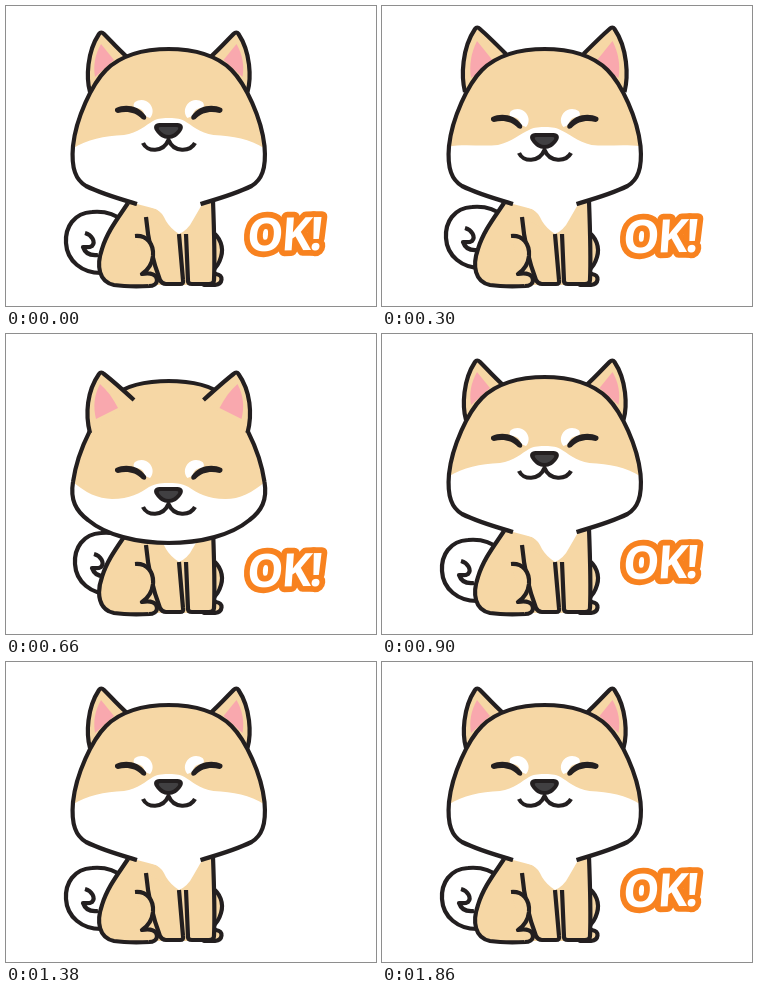
These frames come from a looping animation (370x300 px, 1.92 s). An HTML page:

```html
<!DOCTYPE html>
<html lang="en">
<head>
<meta charset="utf-8">
<title>Nodding puppy</title>
<style>
  html, body { margin: 0; width: 100%; height: 100%; overflow: hidden; background: #fff; }
  svg { display: block; width: 370px; height: 300px; }
  .ink { fill: none; stroke: #231f20; stroke-width: 4.2; stroke-linejoin: round; }
  .tan { fill: #f6d7a5; }
  .white { fill: #fff; }
  .pink { fill: #f9a8ae; }
  .dark { fill: #231f20; }
  .ok {
    font: bold 46px "Open Sans", "Noto Sans", sans-serif; letter-spacing: -2.2px;
    fill: #fff; stroke: #f8821f; stroke-width: 11.5; stroke-linejoin: round; paint-order: stroke;
  }
</style>
</head>
<body>
<svg viewBox="0 0 370 300">
  <g id="tail">
    <path class="ink white" d="M117 215C108 207 97 205 86 206C68 207 59 221 60 237C61 255 76 267 95 267L112 250Z"/>
    <path class="ink" d="M79 227C86 229 90 236 86 240C83 242 80 241 77 241C79 247 84 250 92 249"/>
  </g>
  <path class="ink tan" d="M206 226C214 231 218 241 215 251C213 258 210 262 206 265Z"/>
  <path class="ink tan" d="M200 268H210C218 269 217 278 209 279H198Z"/>
  <path class="tan" d="M122 197C112 212 101 226 96 243C90 260 93 276 108 279H207L208 197Z"/>
  <path class="ink" d="M122 197C112 212 101 226 96 243C90 260 93 276 108 279Q122 281 144 280"/>
  <path class="ink tan" d="M140 211C142 233 147 256 154 274Q156 278 160 278H174Q178 278 177 274L173 228"/>
  <path class="ink tan" d="M129 230C141 229 148 238 147 250C146 259 142 264 136 268C145 266 151 269 151 274C151 278 147 280 143 280"/>
  <path class="white" d="M128 195L150 203Q156 206 160 215Q164 222 173 228Q182 224 187 214L198 195Z"/>
  <path class="ink" d="M180 228L182 275Q182 278 186 278H203Q208 278 208 274C209 252 208 221 207 195"/>
  <g id="heads"></g>
  <g id="label"><g transform="rotate(-1) skewX(-5)"><text class="ok" x="-1" y="16.5" text-anchor="middle">OK!</text></g></g>
</svg>
<script>
  const STEP = 120, STEPS = 16;
  const raisedHead = 'M164 43C135 43 113 51 100 64C86 78 70 112 67 140C65 163 70 174 80 180C96 188 114 193 131 198';
  const poses = [
    { // head up
      ear: 'M84 86C80 72 81 46 93 28Q95 25 98 28C105 35 112 43 121 51',
      pink: 'M95 38C89 49 87 59 89 71L108 54Z',
      head: raisedHead,
      brow: 'M60 147C78 134 95 130 118 129C132 127 140 119 147 115C152 112 158 112 164 112',
      eyes: 0, snout: 0
    },
    { // halfway
      ear: 'M83 86C79 70 80 42 93 23Q95 20 98 23C106 30 115 39 124 48',
      pink: 'M95 35C89 47 87 59 89 72L112 56Z',
      head: raisedHead,
      brow: 'M60 142C78 137 98 141 116 139C130 136 139 127 147 124C152 121 158 121 164 121',
      eyes: 9, snout: 10
    },
    { // head down
      ear: 'M84 99C79 80 81 57 93 40Q95 37 98 40C107 47 117 56 128 66',
      pink: 'M94 50C88 61 87 73 90 85L112 74C107 64 101 56 94 50Z',
      head: 'M164 47C135 47 118 53 108 62C92 78 72 113 67 148C64 166 70 177 82 186C100 201 130 209 164 209',
      brow: 'M60 142C76 157 90 165 106 165C124 165 134 159 143 153C150 149 157 149 164 149',
      eyes: 32, snout: 36, earsInFront: true
    }
  ];

  const path = (kind, d) => `<path class="${kind}" d="${d}"/>`;
  const mirrored = s => `${s}<g transform="translate(325.5) scale(-1 1)">${s}</g>`;
  const lowered = (dy, s) => `<g transform="translate(0 ${dy})">${s}</g>`;

  const eyes = mirrored(
    path('white', 'M129 96C133 93 140 93 144 98C148 103 147 109 144 112L139 110C138 104 134 102 130 102C127 101 127 98 129 96Z') +
    path('dark', 'M110 102C119 98 132 99 140 110C141 113 139 115 136 113C129 106 121 105 112 107C109 107 108 103 110 102Z'));
  const snout =
    path('ink', 'M137 137C141 146 157 147 162.5 134C168 147 184 146 189 137') +
    '<g transform="translate(162.5 125)">' +
    path('dark', 'M-9 -8H9C14 -8 16 -4 13 0C10 5 5 8 0 8S-10 5 -13 0C-16 -4 -14 -8 -9 -8Z') +
    '<path d="M-8 -4H8Q11 -4 9 -1Q5 4 0 4T-9 -1Q-11 -4 -8 -4Z" fill="#414042"/></g>';

  function headMarkup(p, i) {
    const fill = p.head + 'L150 203L164 211Z';
    const ears = mirrored(path('ink tan', p.ear) + path('pink', p.pink));
    const skull = mirrored(path('white', fill)) +
      mirrored(`<clipPath id="skull${i}"><path d="${fill}"/></clipPath>` +
        `<g clip-path="url(#skull${i})">${path('tan', p.brow + 'V0H60Z')}</g>`) +
      mirrored(path('ink', p.head));
    return `<g>${p.earsInFront ? skull + ears : ears + skull}` +
      `${lowered(p.eyes, eyes)}${lowered(p.snout, snout)}</g>`;
  }

  const heads = document.getElementById('heads');
  const tail = document.getElementById('tail');
  const label = document.getElementById('label');
  heads.innerHTML = poses.map(headMarkup).join('');

  const swing = [0, 1, 2, 1];
  const tailShift = ['0 0', '4 -5', '9 -7'];
  const labelDrop = [0, 2, 8];

  // The label shows for the nodding half, shrinking out and growing in around it.
  function labelScale(step) {
    if (step <= 8) return 1;
    return step === 9 || step === STEPS - 1 ? .72 : 0;
  }

  function draw(time) {
    // Steps are centred on multiples of STEP, so the resting pose spans the loop seam.
    const step = Math.floor(time / STEP + .5) % STEPS;
    const phase = swing[step % swing.length];
    const nod = step < 8 ? phase : 0;
    [...heads.children].forEach((head, i) => head.style.display = i === nod ? '' : 'none');
    tail.setAttribute('transform', `translate(${tailShift[phase]})`);
    label.setAttribute('transform', `translate(279 ${228 + labelDrop[nod]}) scale(${labelScale(step)})`);
  }

  const start = performance.now();
  function tick() {
    draw(performance.now() - start);
    requestAnimationFrame(tick);
  }
  tick();
</script>
</body>
</html>
```
